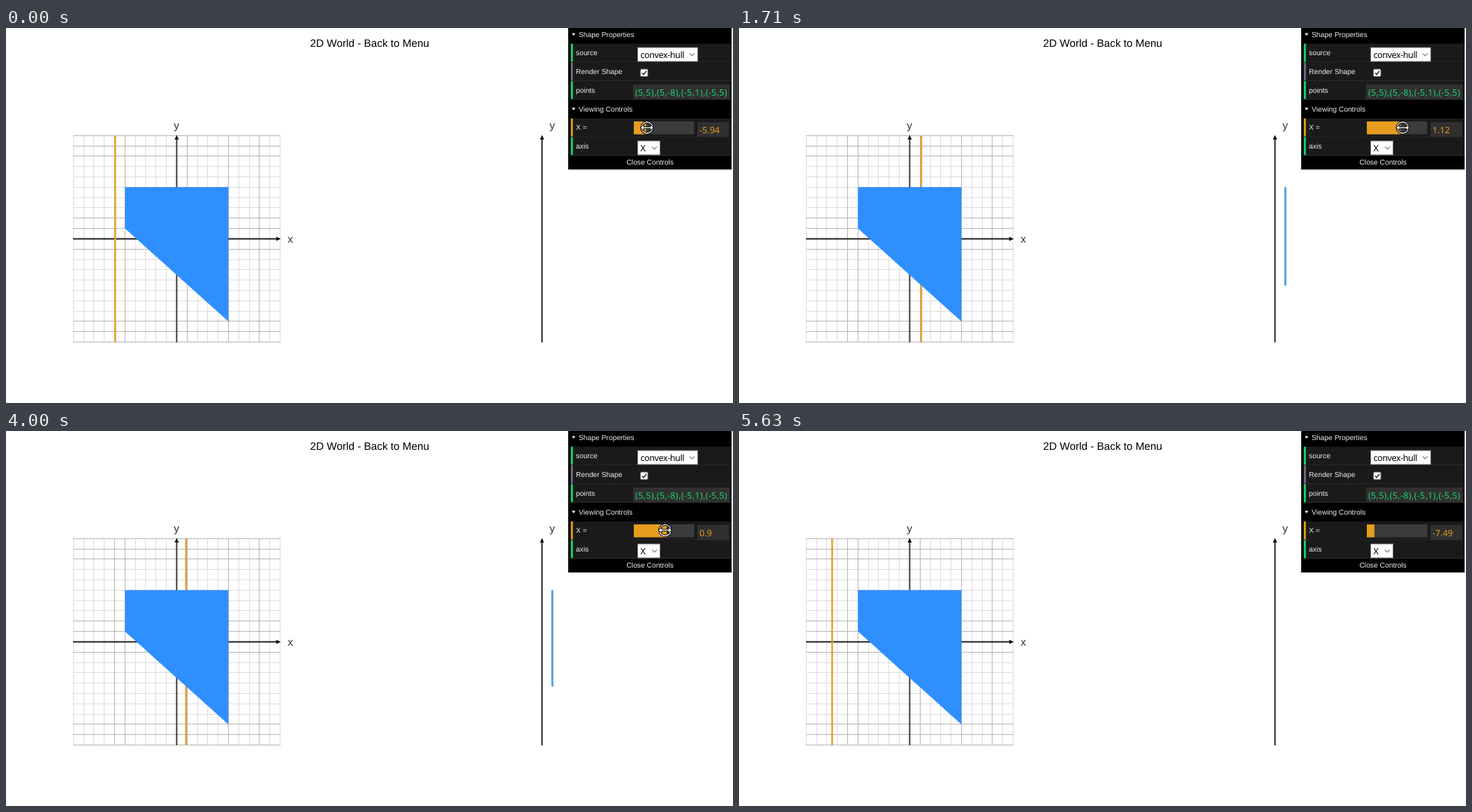
Animation of 1041x538 px, one loop 5.73 s. Source, as an HTML page:

```html
<!DOCTYPE html>
<html lang="en">
<head>
<meta charset="utf-8">
<title>2D World</title>
<style>
html, body { margin: 0; width: 100%; height: 100%; overflow: hidden; background: #fff; }
svg { display: block; width: 1041px; height: 538px; }
text { font-family: "Liberation Sans", Arial, sans-serif; text-rendering: geometricPrecision; white-space: pre; }
.label { font-size: 10.3px; fill: #eee; }
.field { font-family: "Noto Sans", sans-serif; font-size: 12.6px; }
.axis { font-size: 15.5px; fill: #333; text-anchor: middle; }
</style>
</head>
<body>
<svg id="stage" viewBox="0 0 1041 538" xmlns="http://www.w3.org/2000/svg"></svg>
<script>
const LOOP = 5730, UNIT = 14.82, OX = 244.4, OY = 302.4;
const ORANGE = '#e69c1f', GREEN = '#1ed36f', BLUE = '#2f8fff';
const stage = document.getElementById('stage');
const px = x => OX + x * UNIT;
const py = y => OY - y * UNIT;

function add(tag, attrs, content) {
  const el = document.createElementNS('http://www.w3.org/2000/svg', tag);
  for (const k in attrs) el.setAttribute(k, attrs[k]);
  if (content) el.textContent = content;
  stage.appendChild(el);
  return el;
}
const rect = (x, y, width, height, fill, more) => add('rect', { x, y, width, height, fill, ...more });
const path = (d, more) => add('path', { d, fill: 'none', ...more });
const text = (x, y, s, cls, more) => add('text', { x, y, class: cls, ...more }, s);
const set = (el, attrs) => { for (const k in attrs) el.setAttribute(k, attrs[k]); };

// Plane
text(520.8, 27, '2D World - Back to Menu', '', { 'font-size': 15.3, 'text-anchor': 'middle' });
const darkCols = [4, 5, 11, 15, 18], darkRows = [0, 1, 2, 8, 9, 11, 18, 19, 20];
const gridLine = (d, dark) => path(d, { stroke: dark ? '#b4b4b4' : '#dcdcdc' });
for (const dark of [false, true]) {
  for (let i = 0; i <= 20; i++) {
    const x = Math.floor(px(i - 10)) + 0.5, y = Math.floor(py(10 - i)) + 0.5;
    if (darkCols.includes(i) === dark) gridLine(`M${x} 154V451`, dark);
    if (darkRows.includes(i) === dark) gridLine(`M96 ${y}H393`, dark);
  }
}
function upAxis(x, color) {
  path(`M${x} 156V451`, { stroke: color, 'stroke-width': 2 });
  path(`M${x} 153.5l3 6.5h-6z`, { fill: '#111' });
}
path('M96 302.5H391', { stroke: '#1c1c1c', 'stroke-width': 1.8 });
path('M393.5 302.5l-6.5-3v6z', { fill: '#111' });
upAxis(244.4, '#3a3a3a');
upAxis(767.5, '#222');
text(244, 144.5, 'y', 'axis');
text(407, 307.5, 'x', 'axis');
text(782, 144.5, 'y', 'axis');

const cutLine = rect(0, 154, 2.5, 297, '#e6a02c');
path(`M${px(-5)} ${py(5)}H${px(5)}V${py(-8)}L${px(-5)} ${py(1)}z`, { fill: BLUE });
const section = path('', { fill: '#55a3e4' });

// Panel
rect(805, 0, 234, 203, '#000');
function row(y, name, color) {
  rect(808.8, y, 230.2, 26.8, '#1a1a1a');
  rect(808.8, y + 25.8, 230.2, 1, '#2c2c2c');
  rect(808.8, y, 2.9, 25.8, color);
  text(816, y + 16.5, name, 'label');
}
function folder(y, name) {
  path(`M810 ${y - 5.2}h5.4l-2.7 3.4z`, { fill: '#fff' });
  text(820, y, name, 'label');
}
function select(y, w, s, spacing) {
  rect(904.5, y, w, 20, '#fff', { stroke: '#767676' });
  text(908.5, y + 15.2, s, 'field', { fill: '#000', 'letter-spacing': spacing });
  path(`M${904.5 + w - 11.5} ${y + 8.4}l3.5 3.5 3.5-3.5`, { stroke: '#777', 'stroke-width': 1.1 });
}
folder(12.8, 'Shape Properties');
row(22.5, 'source', GREEN);
row(49.3, 'Render Shape', '#806787');
row(76.1, 'points', GREEN);
folder(119.8, 'Viewing Controls');
row(129.7, 'X =', ORANGE);
row(156.5, 'axis', GREEN);
text(922.2, 196.3, 'Close Controls', 'label', { 'text-anchor': 'middle' });
select(28, 86, 'convex-hull', -0.45);
select(162, 32, 'X', 0);
const hover = path('M904 161.5H938', { stroke: '#555' });
rect(908.5, 59, 10.5, 10.5, '#fff', { rx: 1.5, stroke: '#767676' });
path('M910.8 64.4l2.2 2.4 4-5', { stroke: '#222', 'stroke-width': 1.4 });
rect(898, 81, 138, 21, '#303030');
text(901, 97, '(5,5),(5,-8),(-5,1),(-5,5)', 'field', { fill: GREEN, 'letter-spacing': 0.32 });
rect(1033.5, 81, 2.5, 21, '#303030');
rect(899, 134, 86.5, 18.5, '#3c3c3c');
const fill = rect(899, 134, 0, 18.5, ORANGE);
rect(990, 135, 45, 21.5, '#303030');
const readout = text(993, 150.5, '', 'field', { fill: ORANGE });

// Pointers, drawn around 0,0
function pointer(parts) {
  const g = add('g', {});
  for (const [d, more] of parts) g.appendChild(path(d, more));
  return g;
}
const ring = 'M-8 0a8 8 0 1 0 16 0a8 8 0 1 0-16 0z';
const arrows = 'M-9.5 0l4.5-4v2.8h10v-2.8l4.5 4-4.5 4v-2.8h-10v2.8z';
const resize = pointer([
  [ring, { stroke: '#000', 'stroke-width': 3.4 }],
  [ring, { stroke: '#fff', 'stroke-width': 1.3 }],
  [arrows, { fill: '#fff', stroke: '#000', 'stroke-width': 1 }]
]);
const arrow = pointer([
  ['M0 0V16.2l3.8-3.6 2.4 5.7 2.5-1.1-2.4-5.5h5.2z', { fill: '#fff', stroke: '#000' }]
]);

// Time: the dragged value is sampled at discrete redraws
const runs = [[620, 870, 4], [960, 1160, 3], [1260, 1710, 6], [1800, 1800, 1], [1890, 2420, 7],
  [2530, 2600, 2], [2700, 2700, 1], [3120, 3630, 8], [3740, 4000, 4], [4070, 4250, 3],
  [4360, 4750, 5], [4870, 4870, 1]];
const ticks = [0];
for (const [from, to, n] of runs)
  for (let i = 0; i < n; i++) ticks.push(n > 1 ? from + (to - from) * i / (n - 1) : from);

const keys = [[530, -5.94], [870, -4.4], [1160, -3.35], [1710, 1.12], [1800, 1.76], [2420, 4.6],
  [2530, 5.09], [2700, 5.5], [3050, 5.5], [3630, 3.05], [4000, 0.9], [4250, -1.8],
  [4750, -7.04], [4870, -7.49]];
const slope = i => (keys[i + 1][1] - keys[i][1]) / (keys[i + 1][0] - keys[i][0]);
function tangent(i) {
  if (i === 0 || i === keys.length - 1) return 0;
  const a = slope(i - 1), b = slope(i);
  return a * b > 0 ? 2 * a * b / (a + b) : 0;
}
function valueAt(t) {
  const last = keys.length - 1;
  if (t <= keys[0][0]) return keys[0][1];
  if (t >= keys[last][0]) return keys[last][1];
  const i = keys.findIndex(k => k[0] > t) - 1;
  const [t0, a] = keys[i], [t1, b] = keys[i + 1];
  const h = t1 - t0, u = (t - t0) / h, v = 1 - u;
  return a * v * v * (1 + 2 * u) + b * u * u * (3 - 2 * u)
    + h * u * v * (v * tangent(i) - u * tangent(i + 1));
}
const sliderX = v => 899 + (v + 10) * 4.325;
const show = (el, on) => el.setAttribute('visibility', on ? 'visible' : 'hidden');
const move = (el, x, y) => el.setAttribute('transform', `translate(${x} ${y})`);

function draw(t) {
  let i = ticks.length - 1;
  while (ticks[i] > t + 0.01) i--;
  const v = valueAt(ticks[i]);
  set(cutLine, { x: px(v) - 1.25 });
  set(fill, { width: sliderX(v) - 899 });
  readout.textContent = String(+v.toFixed(2));

  const inside = v >= -5 && v <= 5;
  const low = x => py(1 - 0.9 * (x + 5));
  show(section, inside);
  set(section, { d: `M780.8 ${py(5)}h3V${low(v) + 1}l-3-1.5z` });

  // The pointer runs one redraw ahead of the value, then leaves downwards
  const step = t < 4970 ? -1 : Math.min(11, Math.floor((t - 4970) / (530 / 11) + 0.001));
  const u = step / 11;
  show(resize, step < 1);
  show(arrow, step > 0 && step < 11);
  if (step < 1) {
    const next = valueAt(ticks[Math.min(i + 1, ticks.length - 1)]);
    move(resize, sliderX(next) + 0.5, step === 0 ? 147 : t < 2400 ? 143 : 142.3);
  } else {
    move(arrow, 909 + 118 * u ** 1.5, 150 + 395 * u);
  }
  show(hover, step > 0 && t < 5630);
}

const start = performance.now();
function frame() {
  draw((performance.now() - start) % LOOP);
  requestAnimationFrame(frame);
}
frame();
</script>
</body>
</html>
```
